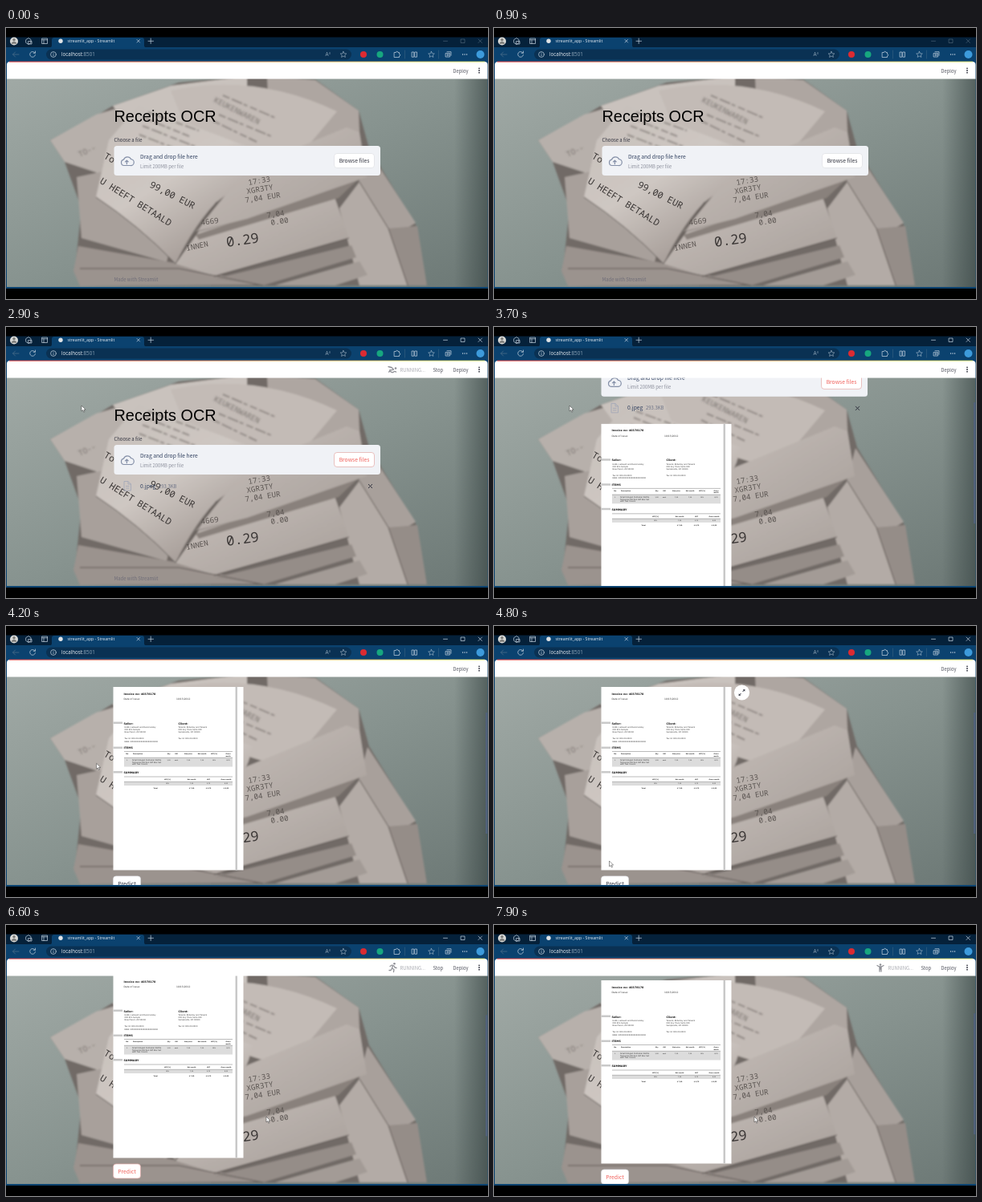
These frames come from a looping animation (600x338 px, 8 s). An HTML page:

```html
<!DOCTYPE html>
<html lang="en">
<head>
<meta charset="utf-8">
<title>Receipts OCR</title>
<style>
html, body { margin: 0; width: 100%; height: 100%; overflow: hidden; background: #000; }
svg { display: block; width: 100vw; height: 100vh; }
text { white-space: pre; }
.ui { font-family: "Noto Sans CJK JP", "Noto Sans CJK SC", "Noto Sans CJK", Lato, sans-serif; font-size: 5.9px; fill: #31333f; }
.big { font-size: 6.75px; }
.chrome { font-family: "Open Sans", "Noto Sans", sans-serif; fill: #e9eff4; }
.line { fill: none; stroke: #c9d6e2; stroke-width: .7; stroke-linecap: round; stroke-linejoin: round; }
.print { font: 500 11.4px "Noto Sans Mono", "Liberation Mono", monospace; fill: #3a3635; }
.print .mid { font-size: 9.3px; fill: #5a5451; }
.print .far { font-size: 9.5px; fill: #7b7571; }
.doc { font-family: "DejaVu Sans", sans-serif; font-size: 2.4px; fill: #333; }
.doc .head { font-size: 3.3px; font-weight: bold; fill: #111; }
.doc .date { font-size: 3px; }
.doc .cell { font-size: 1.9px; text-anchor: middle; fill: #222; }
.doc .bold { font-weight: bold; }
</style>
</head>
<body>
<svg viewBox="0 0 600 338">
  <defs>
    <linearGradient id="wall" x2="1" y2="1">
      <stop offset="0" stop-color="#a0a9a5"/><stop offset=".5" stop-color="#87938f"/><stop offset="1" stop-color="#6c7875"/>
    </linearGradient>
    <linearGradient id="edge">
      <stop offset=".93" stop-color="#33403f" stop-opacity="0"/><stop offset="1" stop-color="#33403f" stop-opacity=".6"/>
    </linearGradient>
    <linearGradient id="paper" x2=".6" y2="1">
      <stop offset="0" stop-color="#c6bfba"/><stop offset=".55" stop-color="#cec7c2"/><stop offset="1" stop-color="#a49b96"/>
    </linearGradient>
    <linearGradient id="fold" x2="1" y2="1">
      <stop offset="0" stop-color="#c8c0bb"/><stop offset="1" stop-color="#a69e99"/>
    </linearGradient>
    <linearGradient id="stripe"><stop offset="0" stop-color="#ff4b4b"/><stop offset="1" stop-color="#fffd80"/></linearGradient>
    <filter id="soft"><feGaussianBlur stdDeviation="1.1"/></filter>
    <clipPath id="view"><path d="M1 63H599.5V323H1z"/></clipPath>
  </defs>

  <rect width="600" height="338" fill="#000"/>
  <rect y="11.5" width="600" height="13" fill="#05213a"/>
  <rect y="24" width="600" height="301" fill="#0b426f"/>

  <!-- photo backdrop -->
  <g clip-path="url(#view)">
    <rect y="63" width="600" height="262" fill="url(#wall)"/>
    <rect y="63" width="600" height="262" fill="url(#edge)"/>
    <g filter="url(#soft)">
      <path fill="#716a66" d="M55 140L108 112L133 97L215 68L300 60L385 64L439 103L452 150L510 245L524 321L92 322L86 300L94 225L73 167z"/>
      <path fill="#b7b0ab" d="M55 140L112 108L190 85L215 150L125 208L112 180L73 167z"/>
      <path fill="#a8a09b" d="M88 186L125 178L205 270L200 292L94 262z"/>
      <path fill="#c9c2bd" d="M133 97L205 72L300 60V140L180 160z"/>
      <path fill="#aea6a1" d="M325 60L385 65L439 103L440 130L400 165L330 180z"/>
      <path fill="#c3bbb6" d="M205 78Q310 55 412 104L350 178L230 140z"/>
      <path fill="#a8a09b" d="M450 151L510 243L482 260L436 205z"/>
      <path fill="#b3aba6" d="M440 192L476 250L500 321H440L415 225z"/>
      <path fill="#958d88" d="M476 250L512 247L524 321H500z"/>
      <path fill="#9b938e" d="M84 303L90 272L215 294L310 320L92 322z"/>
      <path fill="#958d88" d="M259 313L430 271L436 286L320 321z"/>
      <path fill="#a39b96" d="M335 321L440 291L450 308L410 321z"/>
      <path fill="url(#fold)" d="M211 294L240 254L408 208L427 262L259 309z"/>
      <path fill="#89817c" d="M236 258L439 188L414 212L240 264z"/>
      <path fill="url(#fold)" d="M236 254L300 175L424 124L440 130L449 186L300 238z"/>
      <path fill="url(#paper)" d="M165 96L306 150Q302 190 262 217Q234 246 211 294Q165 246 112 211L128 140z"/>
      <path fill="none" stroke="#5c5551" d="M112 211Q165 246 211 294L262 217M259 310L427 262M92 300L215 300L320 321M440 192L476 250L500 321"/>
    </g>
    <g class="print">
      <text transform="translate(116 193) rotate(32)">U HEEFT BETAALD</text>
      <text transform="translate(178 198) rotate(27)">99,00 EUR</text>
      <text transform="translate(121 162) rotate(30)">Totaal</text>
      <g filter="url(#soft)">
        <text class="far" transform="translate(92 161) rotate(-25)">TO--</text>
        <text class="far" transform="translate(258 92) rotate(27)">KEUKENWAREN</text>
      </g>
      <g class="mid">
        <text class="mid" transform="translate(302 196) rotate(-10)">17:33</text>
        <text class="mid" transform="translate(300 207) rotate(-10)">XGR3TY</text>
        <text class="mid" transform="translate(298 218) rotate(-9)">7,04 EUR</text>
        <text class="mid" transform="translate(325 237) rotate(-9)">7,04</text>
        <text class="mid" transform="translate(330 246) rotate(-9)">0.00</text>
        <text class="mid" transform="translate(243 246) rotate(-8)">4669</text>
        <text class="mid" transform="translate(225 278) rotate(-12)">INNEN</text>
      </g>
      <text transform="translate(275 273) rotate(-8)" style="font-size:17px">0.29</text>
    </g>
    <path filter="url(#soft)" fill="none" stroke="#77706c" stroke-width="2" stroke-dasharray="9 3 14 2 5 4" opacity=".6" d="M177 105L240 128M174 113L228 135M170 122L236 148M166 133L220 154M270 84L335 112M265 108L330 135M258 116L312 142"/>

    <g id="page">
      <text x="134.5" y="117.2" font-family="Liberation Sans, Arial, sans-serif" font-size="19.9" fill="#000">Receipts OCR</text>
      <g class="ui">
        <text x="134.5" y="141.5">Choose a file</text>
        <rect x="134.5" y="147" width="331.5" height="37" rx="3.5" fill="#f0f2f6"/>
        <path fill="none" stroke="#8590a8" stroke-width="1.4" stroke-linejoin="round" transform="translate(150.800 165.500) scale(.86) translate(-151.500 -165)" d="M147 172a4.4 4.4 0 0 1-.4-8.7a5.6 5.6 0 0 1 10.4-.5a4.6 4.6 0 0 1-.5 9.2zM151 170.500V165M148.500 167L151 164.500L153.500 167"/>
        <text x="167" y="162.700" class="big" style="fill:#31405f">Drag and drop file here</text>
        <text x="167" y="174.500" style="fill:#8b8e9b">Limit 200MB per file</text>
        <rect id="browseBox" x="408.500" y="156.500" width="50" height="18" rx="3.5" fill="#fff" stroke-width=".7"/>
        <text id="browse" x="433.500" y="168" class="big" text-anchor="middle">Browse files</text>
        <text id="footer" x="134.500" y="315.800" style="fill:#6f6d78">Made with Streamlit</text>
        <g id="file">
          <path fill="none" stroke="#a0a6b8" stroke-width=".8" d="M147 192.500h5l3.500 3.500v8h-8.500zM152 192.500v3.500h3.500M149 198.500h4.500M149 201h4.500"/>
          <text x="167" y="200.500" class="big" style="fill:#31405f">0.jpeg</text>
          <text x="190" y="200.500" style="fill:#6d7387">293.3KB</text>
          <path stroke="#31333f" stroke-width="1" d="M451 196l5 5m0-5l-5 5"/>
        </g>
      </g>
      <g id="result">
        <g id="invoice" class="doc" transform="translate(1 97)">
          <rect x="133.500" y="121" width="162" height="228.500" fill="#fff"/>
          <path fill="#c9c9c9" d="M285.500 121h2.500v228.500h-2.500zM133.500 164.500h11.500v2.500h-11.500zM133.500 195.500h11.500v2.500h-11.500zM133.500 226h11.500v2.500h-11.500z"/>
          <path fill="#dcdcdc" d="M147 209.500h135v11h-135zM147 239.500h135v4.500h-135z"/>
          <path fill="none" stroke="#555" stroke-width=".4" d="M147 201.500h135M147 233h135M147 209.300h135M147 239.300h135"/>
        </g>
        <rect id="predictBox" x="134.500" y="454" width="34" height="18" rx="3.500" fill="#fff" stroke-width=".7"/>
        <g class="ui"><text id="predict" class="big" x="151.500" y="465.500" text-anchor="middle">Predict</text></g>
        <g id="expand">
          <circle cx="309.500" cy="225" r="9.600" fill="#fff"/>
          <path d="M310.500 224l2.500-2.500M308.500 226l-2.500 2.500" stroke="#31333f"/>
          <path d="M310.700 221.200h2.600v2.600zM305.700 226.200v2.600h2.600z" fill="#31333f"/>
        </g>
      </g>
    </g>
    <rect id="thumb" x="597" width="2.500" height="151" fill="#52617b"/>
  </g>

  <!-- app header -->
  <path fill="#fff" d="M1 63.500V46q0-4 4-4H595.500q4 0 4 4V63.500z"/>
  <rect x="4" y="41.700" width="592" height="1" fill="url(#stripe)"/>
  <g class="ui">
    <text x="556.500" y="55.500" style="font-size:5.800px;fill:#50525c">Deploy</text>
    <g fill="#31333f"><circle cx="589" cy="50.300" r=".9"/><circle cx="589" cy="53" r=".9"/><circle cx="589" cy="55.700" r=".9"/></g>
    <g id="running">
      <path id="athlete" fill="none" stroke="#8f9096" stroke-width="1.300" stroke-linecap="round" stroke-linejoin="round"/>
      <circle id="athleteHead" r="1.300" fill="#8f9096"/>
      <text x="490.500" y="55.500" style="fill:#a7a8ae">RUNNING...</text>
      <text x="531.500" y="55.500" style="font-size:5.800px;fill:#50525c">Stop</text>
    </g>
  </g>

  <!-- browser chrome -->
  <path fill="#0b426f" d="M54 24.500q3 0 3-3V15q0-3 3-3H169q3 0 3 3v6.500q0 3 3 3z"/>
  <rect x="50" y="26.500" width="380" height="13" rx="6.500" fill="#0a3153"/>
  <circle cx="10" cy="16.500" r="5" fill="#d9d9d6"/>
  <circle cx="10" cy="14.800" r="1.700" fill="#7b7b78"/>
  <path fill="#7b7b78" d="M6.800 19.800a3.200 2.700 0 0 1 6.400 0z"/>
  <circle cx="68" cy="16.300" r="2.700" fill="#dfe3e6"/>
  <text class="chrome" x="76.500" y="18.300" font-size="5.170">streamlit_app - Streamlit</text>
  <text class="chrome" x="69" y="35.400" font-size="6.200">localhost<tspan fill="#91a7ba">:8501</tspan></text>
  <text class="chrome" x="397.500" y="35.300" font-size="6.500" style="fill:#8fa5b8">A<tspan font-size="4" dy="-2">))</tspan></text>
  <g class="line">
    <path d="M25 14.500l3-2l3 2v4l-3 2l-3-2zM28 16.500h4v3.500h-4zM45 13h6.500v6.500h-6.500zM45 14.800h6.500M47 14.800v4.700"/>
    <path d="M163 14.500l3.500 3.500m0-3.500l-3.500 3.500M177 16.300h6.500M180.200 13v6.500"/>
    <path id="controls" d="M544.500 16.300h5M566.500 14h4.500v4.500h-4.500zM588 14l4.500 4.500m0-4.500l-4.500 4.500"/>
    <path stroke="#55748f" d="M16 33h-7.500l3-3m-3 3l3 3"/>
    <path d="M36 31a3.400 3.400 0 1 0 .5 2.500M36.500 29v2.300h-2.300"/>
    <circle cx="59" cy="33" r="3.400"/><path d="M59 32.800v1.800M59 31.200v.1"/>
    <path id="star" opacity=".7" d="M420 29.300l1.100 2.400l2.700.3l-2 1.800l.6 2.600l-2.400-1.300l-2.400 1.300l.6-2.600l-2-1.800l2.700-.3z"/>
    <use href="#star" x="109.500"/>
    <path d="M483.500 30.500h2a1.200 1.200 0 0 1 2.400 0h1.600v2a1.200 1.200 0 0 1 0 2.400v1.600h-6z"/>
    <path d="M505.500 30h2.300v6.200h-2.300zM509.200 30h2.300v6.200h-2.300zM547.500 31.500h5v4.500h-5zM549 29.700h5v4.600M550 32.500v2.500M548.800 33.700h2.500"/>
    <path d="M568.500 33h.1M571 33h.1M573.500 33h.1" stroke-width="1.300"/>
    <path d="M496.500 28v10M538.500 28v10" stroke="#315d80"/>
  </g>
  <circle cx="445" cy="33" r="4" fill="#db2b32"/>
  <circle cx="465.500" cy="33" r="4" fill="#17a77f"/>
  <circle cx="590.500" cy="33" r="5" fill="#3d9bdc"/>

  <path id="cursor" fill="#fff" stroke="#333" stroke-width=".5" d="M0 0V7l1.700-1.500l1.100 2.600l1.200-.5l-1.100-2.500h2.200z"/>
</svg>
<script>
const $ = id => document.getElementById(id);
const set = (id, name, value) => $(id).setAttribute(name, value);
const show = (id, on) => set(id, "display", on ? "inline" : "none");
const RED = "#f0605a", INK = "#31333f", EDGE = "#dfe0e4", WARM = "#e3aaa7";

// invoice details
function write(x, y, lines, cls = "", step = 2.9) {
  lines.forEach((line, i) => {
    const el = document.createElementNS("http://www.w3.org/2000/svg", "text");
    el.setAttribute("x", x);
    el.setAttribute("y", y + i * step);
    el.setAttribute("class", cls);
    el.textContent = line;
    $("invoice").append(el);
  });
}
const row = (y, xs, cells, bold = "") =>
  cells.forEach((cell, i) => write(xs[i], y, cell.split("|"), "cell " + bold, 2.4));

write(146.5, 130.5, ["Invoice no: 40378170"], "head");
write(146.5, 137, ["Date of issue:"], "date");
write(212, 137, ["10/15/2012"], "date");
write(146.5, 167.5, ["Seller:"], "head");
write(214.5, 167.5, ["Client:"], "head");
write(147.5, 172, ["Hobb, Larkwell and Dunsmoreby", "000 Elm Sample", "New Placet, ZZ 00000"]);
write(214.5, 172, ["Tarwick, Ebberley and Tarwick", "000 Any Trace Suite 000", "Sampleville, ZZ 00000"]);
write(147.5, 186, ["Tax Id: 000-00-0000", "IBAN: ZZ00XXXX00000000000000"], "", 3.6);
write(214.5, 186, ["Tax Id: 000-00-0000"]);
write(146.5, 198.2, ["ITEMS"], "head");
write(146.5, 228.8, ["SUMMARY"], "head");
write(157, 213, ["Small Hinged Container Bottle", "Turquoise Kitchen Gift Box Set", "with Two Covers"], "", 2.7);
const itemCols = [151, 164, 202.5, 212, 227, 244, 259, 276.5];
const sumCols = [201, 231, 252, 274];
row(205.2, itemCols, ["No.", "Description", "Qty", "UM", "Net price", "Net worth", "VAT [%]", "Gross|worth"], "bold");
row(213, itemCols, ["1.", "", "1,00", "each", "7,50", "7,50", "10%", "8,25"]);
row(237, sumCols, ["VAT [%]", "Net worth", "VAT", "Gross worth"], "bold");
row(242.4, sumCols, ["10%", "7,50", "0,75", "8,25"]);
row(248, [186, 231, 252, 274], ["Total", "$ 7,50", "$ 0,75", "$ 8,25"], "bold");

const scrollKeys = [[3300, 0], [3700, 97], [4000, 142], [4850, 142], [5050, 156], [7100, 156], [7200, 149]];
const cursorKeys = [[3900, 94, 98], [4700, 143.5, 293], [4900, 143.5, 293], [5200, 150, 305], [5450, 150, 305], [6000, 324, 239]];

// value(s) between timed keys
function at(keys, t) {
  const i = keys.findIndex(k => k[0] > t);
  if (i < 0) return keys.at(-1).slice(1);
  if (i === 0) return keys[0].slice(1);
  const [a, b] = [keys[i - 1], keys[i]];
  const p = (t - a[0]) / (b[0] - a[0]);
  return a.slice(1).map((v, j) => v + (b[j + 1] - v) * p);
}

// swimming, running, arms raised
const poses = [
  ["M476 49.500l4 1l2.500 2.500l-5 1M476.500 56q1.500-1.300 3 0t3 0t3 0", 485, 51.500],
  ["M478 51.500l2.500-1.500l2.500 1l1 2l2 .5M481.500 51l-1 3l2.500 1.500l-.5 3M480.500 54l-1.500 2.500h-2", 483.500, 48.300],
  ["M477 50.500l2.500 1.500h3l2.500-1.500M481 52v3M480 52v6M482 52v6", 481, 49.500]
];

function draw() {
  const t = performance.now() % 8000;
  const [scroll] = at(scrollKeys, t);
  const focused = t >= 1600, chosen = t >= 2700, loaded = t >= 3100, clicked = t >= 5350;
  set("page", "transform", `translate(${loaded ? -1 : 0} ${-scroll})`);

  set("browseBox", "stroke", focused ? WARM : EDGE);
  $("browse").style.fill = focused ? RED : INK;
  set("controls", "opacity", chosen ? 1 : .35);
  show("file", chosen);
  show("footer", !loaded);
  show("result", loaded);
  show("expand", t >= 4350 && t < 5050);
  set("predictBox", "stroke", clicked && t < 7100 ? WARM : EDGE);
  $("predict").style.fill = t >= 5150 ? RED : INK;

  show("thumb", loaded);
  set("thumb", "y", 64 + scroll * .31);

  show("running", (chosen && t < 3200) || clicked);
  const [path, x, y] = poses[Math.floor(t / 300) % 3];
  set("athlete", "d", path);
  set("athleteHead", "cx", x);
  set("athleteHead", "cy", y);

  show("cursor", chosen);
  set("cursor", "transform", `translate(${at(cursorKeys, t)})`);
  requestAnimationFrame(draw);
}
draw();
</script>
</body>
</html>
```
